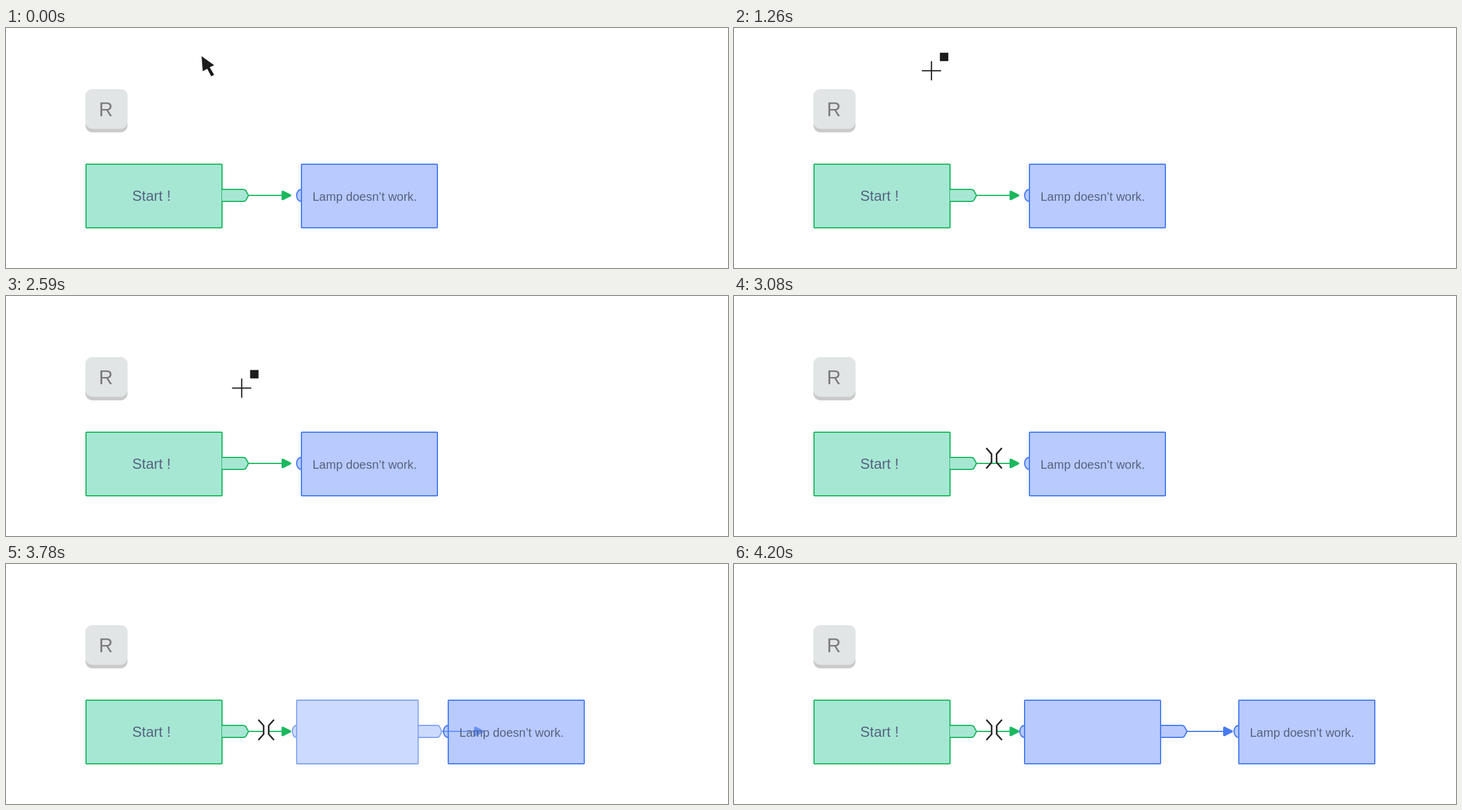
These frames come from a looping animation (1200x400 px, 4.27 s). An HTML page:

```html
<!DOCTYPE html>
<html lang="en">
<head>
<meta charset="utf-8">
<title>Insert a block</title>
<style>
  html, body { margin: 0; height: 100%; overflow: hidden; background: #fff; }
  svg { display: block; width: 100vw; height: 100vh; }
  text { font-family: "Liberation Sans", Arial, sans-serif; fill: #56627f; }
  .green { fill: #a6e7d3; stroke: #1cb85f; color: #1cb85f; }
  .blue { fill: rgba(72, 120, 255, .388); stroke: #477bf0; color: #477bf0; }
  .green, .blue { stroke-width: 2; stroke-linejoin: round; }
  .head { fill: currentColor; stroke-width: 4; }
  .bars { fill: none; stroke: #222; stroke-width: 2.6; }
</style>
</head>
<body>
<svg viewBox="0 0 1200 400">
  <defs>
    <rect id="box" x="1" y="1" width="226" height="106" rx="1"/>
    <path id="bump" d="M1 43A8 10 0 0 0 1 63"/>
    <path id="tag" d="M227 43H262Q265.500 43 267 45.500L271 53L267 60.500Q265.500 63 262 63H227"/>
    <path id="head" class="head" d="M2 -6L14 0L2 6Z"/>
  </defs>

  <rect x="132" y="102" width="70" height="72" rx="12" fill="#cacaca"/>
  <rect id="cap" x="132" y="102" width="70" height="66" rx="12" fill="#e1e5e5"/>
  <text id="letter" x="166" y="147" font-size="32.500" text-anchor="middle">R</text>

  <g class="green" transform="translate(132 226)">
    <use href="#box"/><use href="#tag"/>
    <path d="M271 53H328"/>
    <use href="#head" x="326" y="53"/>
  </g>
  <text x="209.800" y="288" font-size="24">Start !</text>

  <g id="fresh" class="blue">
    <g id="body">
      <use href="#box"/><use href="#bump"/><use href="#tag"/>
      <path d="M271 53H332"/>
    </g>
    <use id="tip" href="#head" y="53"/>
  </g>

  <g id="lamp">
    <g class="blue"><use href="#box"/><use href="#bump"/></g>
    <text x="19.500" y="62" font-size="20">Lamp doesn’t work.</text>
  </g>

  <path id="arrow" fill="#1c1c1c" d="M325 47L346 62L338.500 65.500L346 78L341 80.500L334.500 68L327 72Z"/>
  <g id="cross">
    <path d="M-16 0H16M0 -16V16" stroke="#1c1c1c" stroke-width="2"/>
    <rect x="14" y="-30" width="14" height="14" fill="#1c1c1c"/>
  </g>
  <g id="split">
    <rect x="-4" y="-7" width="8" height="14" fill="#fff"/>
    <path class="bars" d="M-13 -17L-4.200 -7V7L-13 17M13 -17L4.200 -7V7L13 17"/>
  </g>
</svg>
<script>
  const LOOP = 4270, TICK = 70;
  const $ = id => document.getElementById(id);
  const clamp = v => Math.min(1, Math.max(0, v));
  const span = (t, a, b) => clamp((t - a) / (b - a));
  const mix = (a, b, p) => a + (b - a) * p;
  const set = (id, name, value) => $(id).setAttribute(name, value);
  const show = (id, on) => set(id, "visibility", on ? "visible" : "hidden");
  const move = (id, x, y) => set(id, "transform", `translate(${x} ${y})`);

  const inOutQuad = p => p < .5 ? 2 * p * p : 1 - 2 * (1 - p) ** 2;
  const inOutBack = (p, s = 2.25) => {
    const half = u => u * u * ((s + 1) * u - s) / 2;
    return p < .5 ? half(2 * p) : 1 - half(2 - 2 * p);
  };

  function draw(t) {
    const pressed = t >= 770 && t < 1050;
    show("cap", !pressed);
    $("letter").style.fill = pressed ? "#6c6c6c" : "#7c7c7c";

    // The pointer drifts right early, so its path bends downwards.
    const drop = inOutQuad(span(t, 2080, 3220));
    const x = mix(328.2, 432.4, 1 - (1 - drop) ** 1.84);
    const y = mix(71.2, 276.5, drop);
    show("arrow", t < 1260);
    show("cross", t >= 1260 && t < 2800);
    show("split", t >= 2800);
    move("cross", x, y);
    move("split", x, y);

    const push = inOutBack(span(t, 3331, 4157));
    const scale = mix(.645, 1, push);
    move("lamp", 490 + 348 * push, 226);
    set("fresh", "opacity", clamp(push));
    move("fresh", 482, 226);
    set("body", "transform", `translate(1 0) scale(${scale} 1) translate(-1 0)`);
    set("tip", "x", 1 + 330 * scale);
  }

  function frame(now) {
    draw(Math.floor(now % LOOP / TICK) * TICK);
    requestAnimationFrame(frame);
  }
  draw(0);
  requestAnimationFrame(frame);
</script>
</body>
</html>
```
